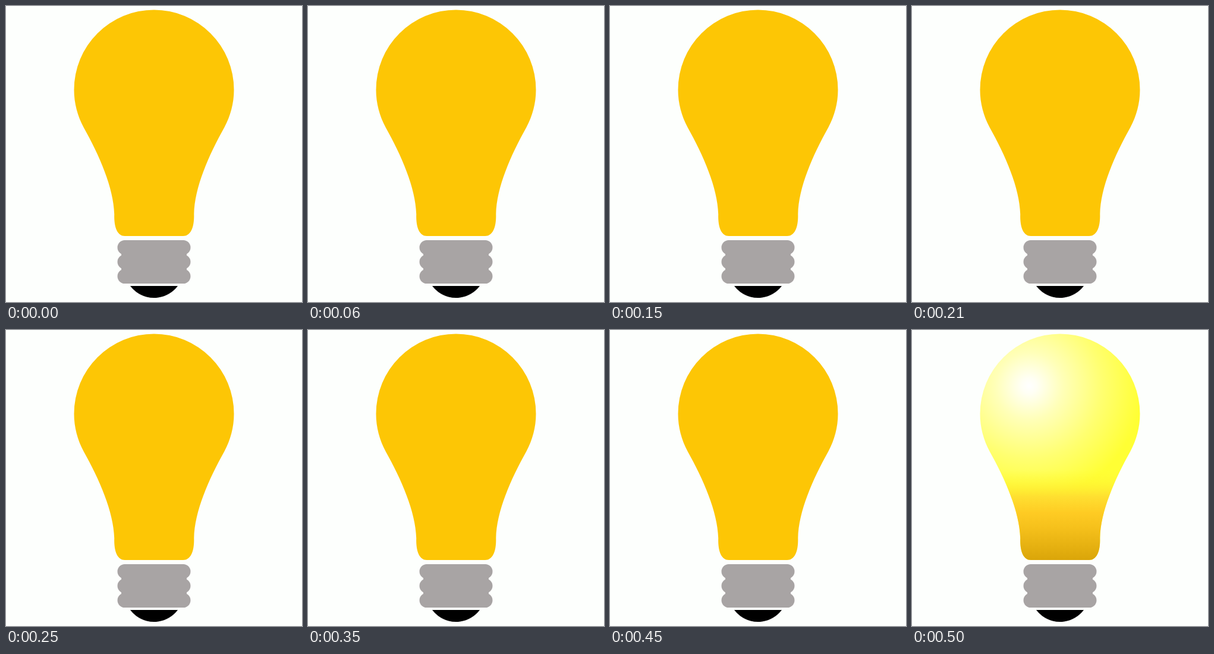
Recreate the animation shown at these times as an HTML page with a canvas. Size 498x498 px, loop 550 ms.

```html
<!DOCTYPE html>
<html>
<head>
<meta charset="utf-8">
<style>
html, body { margin: 0; width: 100%; height: 100%; overflow: hidden; background: #fdfffd; }
canvas { display: block; }
</style>
</head>
<body>
<canvas id="stage" width="498" height="498"></canvas>
<script>
const ctx = document.getElementById('stage').getContext('2d');
const LOOP = 550, FLASH_AT = 500;

const glass = new Path2D(
  'M114.5 141 A134.5 134.5 0 0 1 383.5 141' +
  'C383.5 164 377.5 185 367.5 204' +
  'C341 251 317 306 316.3 350' +
  'C317 374 310 387 298 387 L200 387' +
  'C188 387 181.5 374 182.2 350' +
  'C181 306 157 251 130.5 204' +
  'C120.5 185 114.5 164 114.5 141 Z');

function gradient(g, stops) {
  for (const [at, color] of stops) g.addColorStop(at, color);
  return g;
}

const glow = gradient(ctx.createRadialGradient(197, 94, 0, 197, 94, 190), [
  [0, '#ffffff'], [0.07, '#fffff4'], [0.3, '#ffffb8'],
  [0.65, '#ffff70'], [1, '#ffff34']
]);
const shade = gradient(ctx.createLinearGradient(0, 235, 0, 387), [
  [0, 'rgba(255,250,50,0)'], [0.15, 'rgba(255,240,48,0.5)'],
  [0.3, '#ffdf30'], [0.48, '#fecb23'], [0.65, '#f5c01b'], [1, '#daa509']
]);

function fillGlass(style) {
  ctx.fillStyle = style;
  ctx.fill(glass);
}

function drawBase() {
  ctx.fillStyle = '#a8a4a4';
  ctx.beginPath();
  for (let i = 0; i < 3; i++) ctx.roundRect(187.5, 394 + i * 24.2, 123, 24.6, 12.3);
  ctx.rect(194, 406, 110, 49);
  ctx.fill();

  ctx.fillStyle = '#000';
  ctx.beginPath();
  ctx.moveTo(209, 471);
  ctx.lineTo(289, 471);
  ctx.arc(249, 441, 50, Math.atan2(30, 40), Math.atan2(30, -40));
  ctx.fill();
}

function draw(t) {
  ctx.fillStyle = '#fdfffd';
  ctx.fillRect(0, 0, 498, 498);
  if (t >= FLASH_AT) {
    fillGlass(glow);
    fillGlass(shade);
  } else {
    fillGlass('#fdc605');
  }
  drawBase();
}

const start = performance.now();
function tick() {
  draw((performance.now() - start) % LOOP);
  requestAnimationFrame(tick);
}
tick();
</script>
</body>
</html>
```
